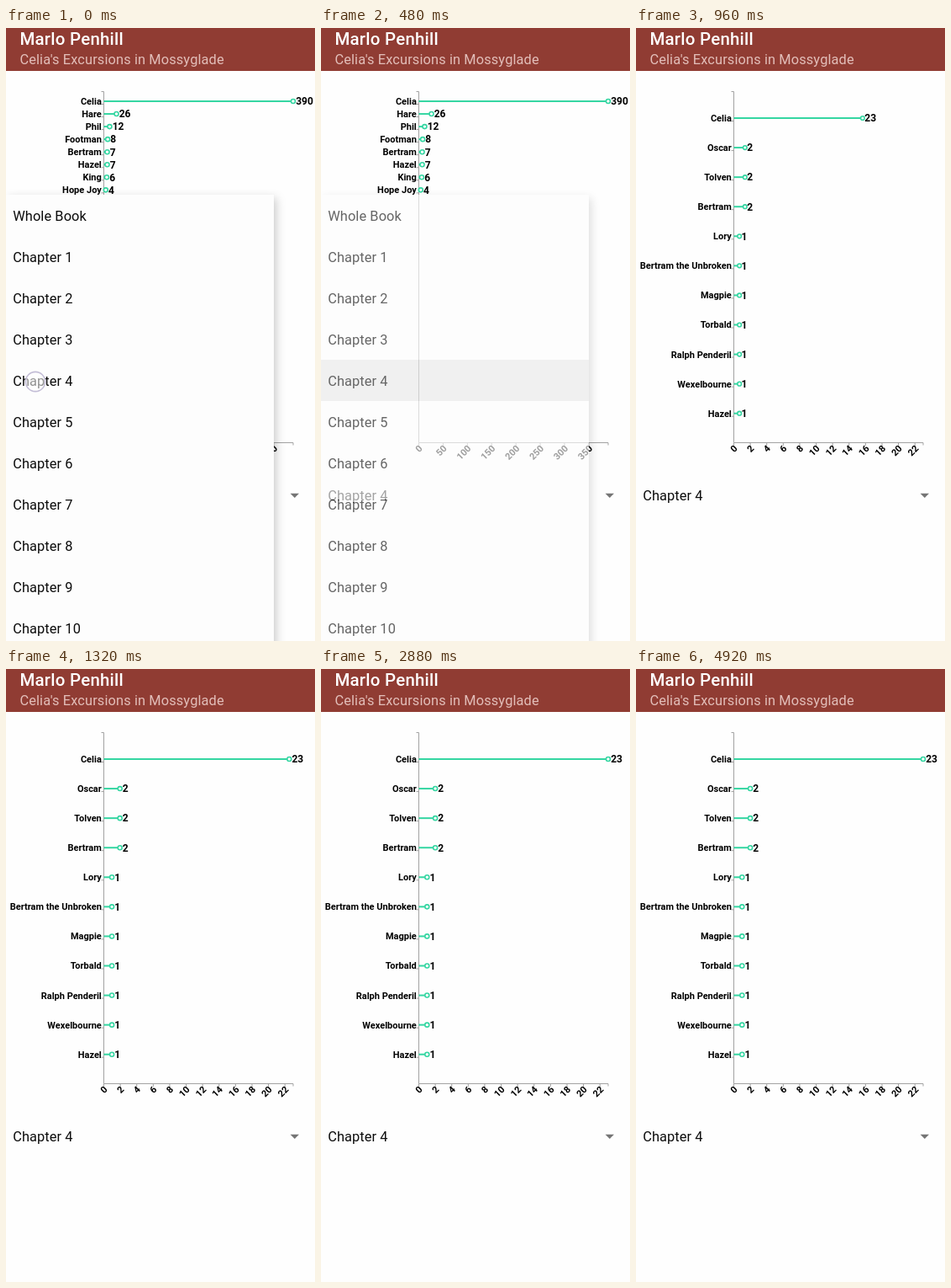
An HTML page for the animation above (5.28 s loop, 368 px wide and 728 px high).

```html
<!DOCTYPE html>
<html lang="en">
<head>
<meta charset="utf-8">
<title>Character mentions</title>
<style>
  html, body { margin: 0; width: 100%; height: 100%; overflow: hidden; background: #fefefe; }
  svg { display: block; width: 368px; height: 728px; font-family: Roboto, sans-serif; }
  .item { font-size: 16.36px; letter-spacing: .006em; fill: #0c0c0c; }
  .name { font-size: 11px; font-weight: 700; text-anchor: end; }
  .value { font-size: 12px; font-weight: 700; }
  .axis { stroke: #a2a2a2; fill: none; }
  .stick { stroke: #35d6a2; stroke-width: 2; }
  .knob { stroke: #35d6a2; stroke-width: 1.6; fill: #fff; }
</style>
</head>
<body>
<svg id="stage" viewBox="0 0 368 728">
  <defs>
    <filter id="shadow" x="-10%" y="-10%" width="125%" height="120%">
      <feDropShadow dx="3" dy="4" stdDeviation="5.5" flood-color="#000" flood-opacity=".2"/>
    </filter>
    <clipPath id="row"><rect x="0" y="394" width="319" height="49"/></clipPath>
  </defs>
  <rect width="368" height="728" fill="#fefefe"/>
  <rect width="368" height="51" fill="#903c33"/>
  <text x="16.4" y="20" font-size="20.44" font-weight="500" letter-spacing=".25" fill="#fff">Marlo Penhill</text>
  <text x="16.4" y="43" font-size="16.36" letter-spacing=".13" fill="#e2beb9">Celia's Excursions in Mossyglade</text>
  <g id="charts"></g>
  <text id="choice" class="item" x="8.2" y="561"></text>
  <path d="M338.6 552.8h10.4l-5.2 5.2z" fill="#757575"/>
  <g id="popup">
    <rect y="198" width="319" height="560" fill="#fdfdfd" filter="url(#shadow)"/>
    <circle id="ripple" cx="160" cy="418.5" fill="#e8e8e8" clip-path="url(#row)"/>
    <g id="items"></g>
  </g>
  <circle id="touch" cy="420" r="11.6" fill="#fff" fill-opacity=".55" stroke="#c3bdd6" stroke-width="1.6"/>
</svg>
<script>
const LOOP = 5280, STEP = 120;
const X0 = 116.5, WIDTH = 225.5, TOP = 75.5, BOTTOM = 492.5;
const $ = id => document.getElementById(id);

function add(parent, tag, attrs, text) {
  const el = document.createElementNS(parent.namespaceURI, tag);
  set(el, attrs);
  if (text !== undefined) el.textContent = text;
  return parent.appendChild(el);
}

function set(el, attrs) {
  for (const key in attrs) el.setAttribute(key, attrs[key]);
}

function makeChart(rows, firstY, gap, max, tickStep) {
  const group = add($('charts'), 'g', {});
  let axis = `M${X0 - 3} ${TOP}H${X0}V${BOTTOM}H${X0 + WIDTH}v3`;
  for (let v = 0; v < max; v += tickStep) {
    const x = X0 + WIDTH * v / max;
    axis += `M${x} ${BOTTOM}v3.5`;
    add(group, 'text', { class: 'name', transform: `translate(${x + 5} 500) rotate(-45)` }, v);
  }
  const bars = rows.map(([name, value], i) => {
    const y = firstY + gap * i;
    axis += `M${X0 - 3} ${y + 3.5}h3`;
    add(group, 'text', { class: 'name', x: 113.8, y: y + 4 }, name);
    return {
      length: WIDTH * value / max,
      stick: add(group, 'line', { class: 'stick', x1: X0, y1: y, y2: y }),
      knob: add(group, 'circle', { class: 'knob', cy: y }),
      label: add(group, 'text', { class: 'value', y: y + 4.3 }, value)
    };
  });
  group.insertBefore(add(group, 'path', { class: 'axis', d: axis }), group.firstChild);

  const grow = p => bars.forEach(b => {
    const x = X0 + b.length * p;
    set(b.stick, { x2: x });
    set(b.knob, { cx: x, r: 1.9 + 0.6 * p });
    set(b.label, { x: x + 0.7 + 2.5 * p });
  });
  grow(1);
  return { group, grow };
}

const book = makeChart([
  ['Celia', 390], ['Hare', 26], ['Phil', 12], ['Footman', 8],
  ['Bertram', 7], ['Hazel', 7], ['King', 6], ['Hope Joy', 4]
], 87, 15.05, 390, 50);

const chapter = makeChart([
  ['Celia', 23], ['Oscar', 2], ['Tolven', 2], ['Bertram', 2], ['Lory', 1],
  ['Bertram the Unbroken', 1], ['Magpie', 1], ['Torbald', 1],
  ['Ralph Penderil', 1], ['Wexelbourne', 1], ['Hazel', 1]
], 107, 35.07, 23, 2);

for (let i = 0; i <= 10; i++) {
  add($('items'), 'text', { class: 'item', x: 8.2, y: 228.8 + 49.05 * i }, i ? 'Chapter ' + i : 'Whole Book');
}

const clamp = v => Math.min(1, Math.max(0, v));
const show = (el, on) => { el.style.display = on ? '' : 'none'; };

function draw(t) {
  const loaded = t >= 589;
  show(book.group, !loaded);
  show(chapter.group, loaded);
  const left = 1 - clamp((t - 589) / 854);
  chapter.grow(1 - left * left);

  const fade = 1 - clamp((t - 398) / 220);
  show($('popup'), fade > 0);
  $('popup').style.opacity = fade;
  // The pressed row has recovered by the time the list is nearly gone.
  show($('ripple'), t >= 360 && t < 600);
  set($('ripple'), { r: 107 + Math.max(0, t - 360) * 0.6 });

  show($('touch'), t < 480);
  set($('touch'), { cx: t < 120 ? 35 : 36, opacity: t < 360 ? 1 : 0.65 });
  $('choice').textContent = t < 400 ? 'Whole Book' : 'Chapter 4';
}

const start = performance.now();
function tick() {
  const t = Math.max(0, performance.now() - start) % LOOP;
  draw(Math.floor(t / STEP) * STEP);
  requestAnimationFrame(tick);
}
draw(0);
requestAnimationFrame(tick);
</script>
</body>
</html>
```
